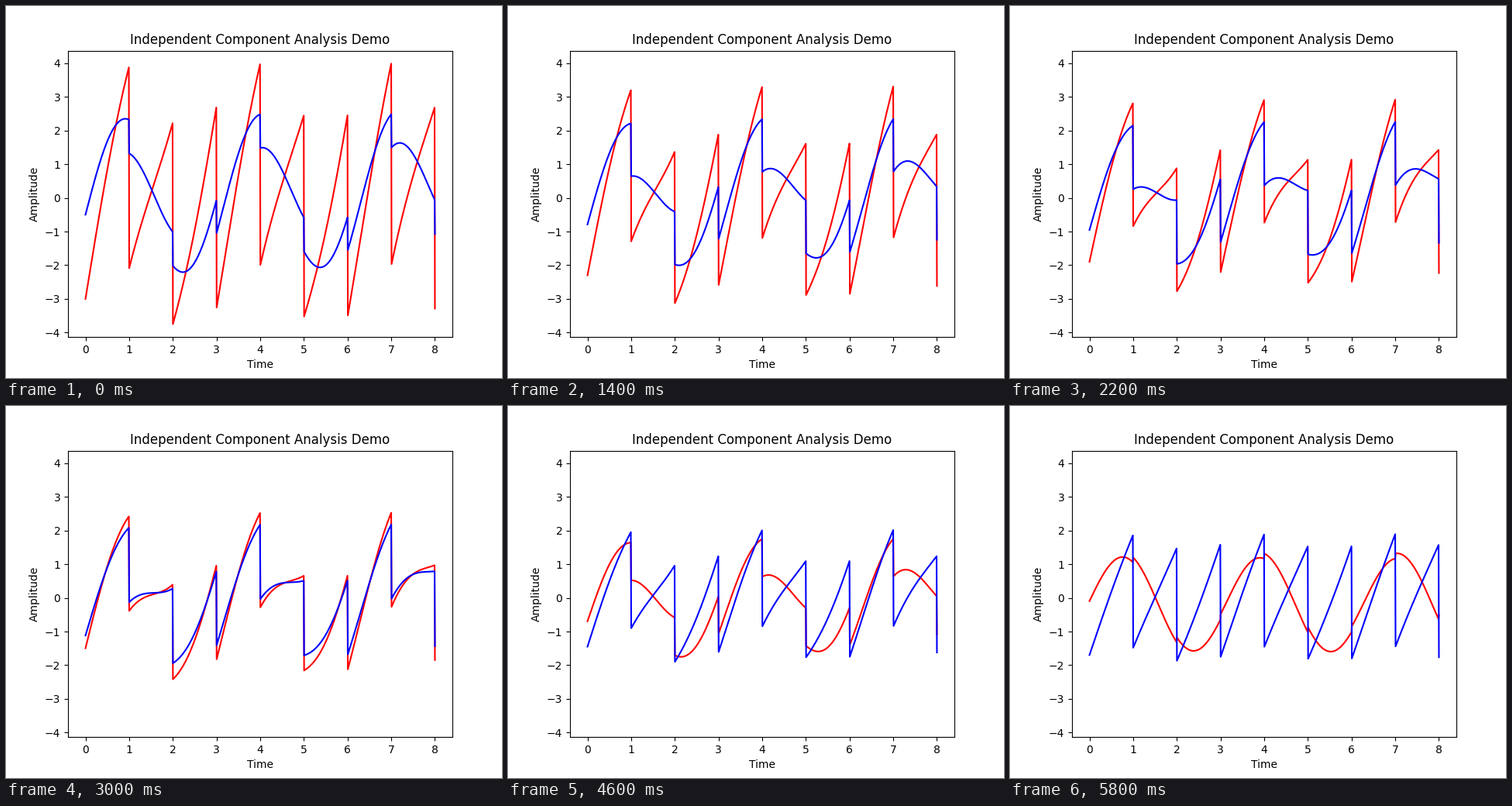
Recreate the animation shown at these times as a matplotlib script. Size 640x480 px, loop 6 s.

```python
import numpy as np
import matplotlib.pyplot as plt
from matplotlib.animation import FuncAnimation

FRAMES = 30
INTERVAL = 200  # ms


def separate(signals, steps=200):
    """One-unit FastICA (tanh) on whitened signals; the second unit is orthogonal."""
    centred = signals - signals.mean(axis=1, keepdims=True)
    white = np.linalg.solve(np.linalg.cholesky(np.cov(centred)), centred)
    w = np.array([1.0, 0.0])
    for _ in range(steps):
        g = np.tanh(w @ white)
        w = (white * g).mean(axis=1) - (1 - g**2).mean() * w
        w *= np.sign(w[0]) / np.linalg.norm(w)
    return np.array([w, [-w[1], w[0]]]) @ white


t = np.linspace(0, 8, 1000)
sources = np.array([np.sin(2 * t), 2 * np.mod(t, 1) - 1])
mixed = np.array([[1, 3], [2, 0.5]]) @ sources
unmixed = separate(sources)

fig, ax = plt.subplots(figsize=(6.4, 4.8), dpi=100)
lines = [ax.plot(t, y, color)[0] for y, color in zip(mixed, ("red", "blue"))]
ax.set_title("Independent Component Analysis Demo")
ax.set_xlabel("Time")
ax.set_ylabel("Amplitude")
ax.set_xlim(ax.get_xlim())
ax.set_ylim(ax.get_ylim())


def update(i):
    a = i / FRAMES
    for line, y in zip(lines, (1 - a) * mixed + a * unmixed):
        line.set_ydata(y)
    return lines


anim = FuncAnimation(fig, update, frames=FRAMES, interval=INTERVAL,
                     repeat=True, repeat_delay=0)
plt.show()
```
